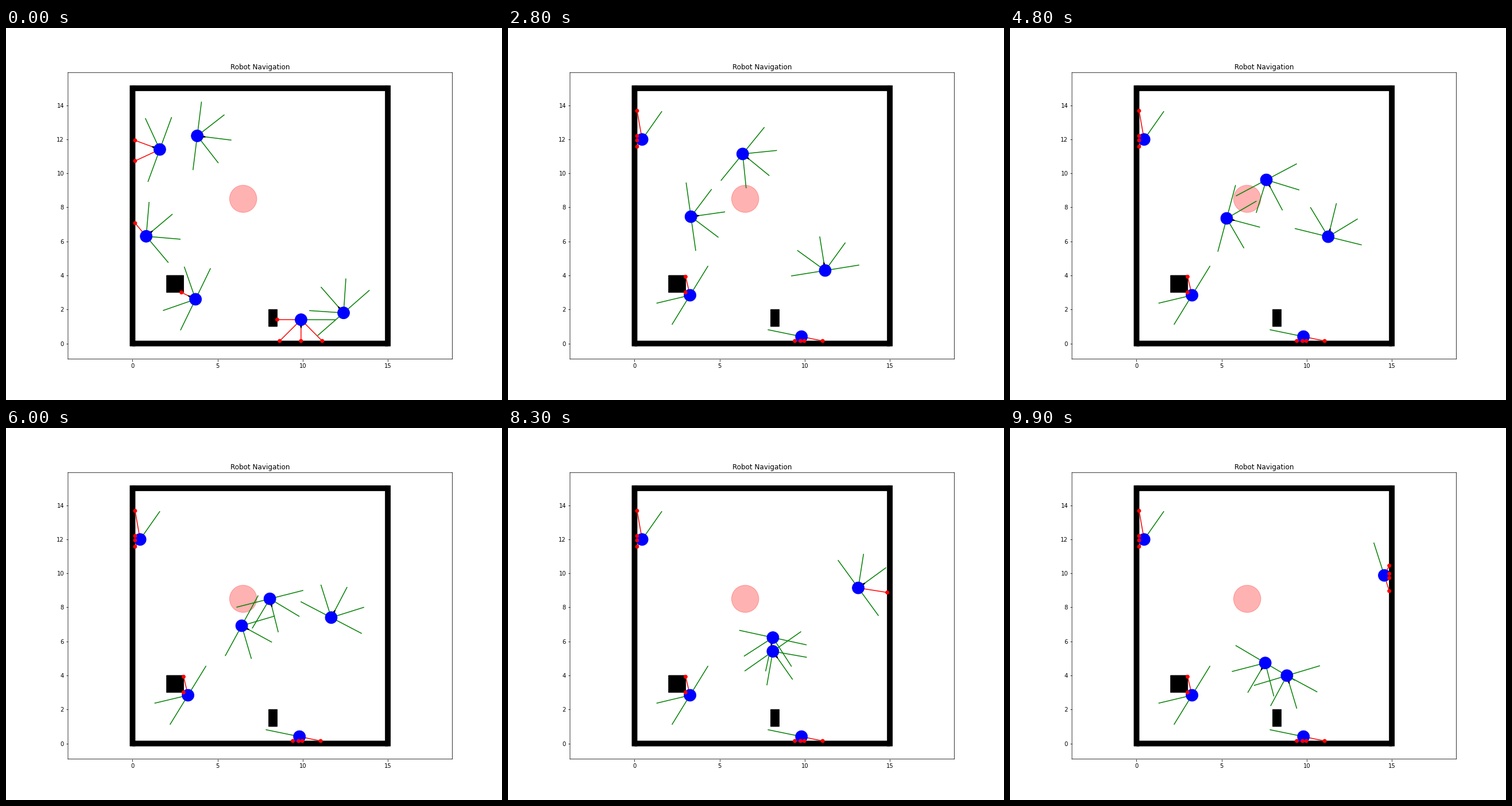
A matplotlib script for the animation above (10000 ms loop, 864x648 px).

```python
import numpy as np
import matplotlib.pyplot as plt
from matplotlib.animation import FuncAnimation
from matplotlib.patches import Circle, Rectangle

FRAMES, INTERVAL = 100, 100
SIZE, HALF = 15, 0.15        # room side, half wall thickness
RADIUS, RANGE = 0.35, 2.0
SPEED, TURN = 0.1, -0.02     # per step
RAYS = np.radians([-90, -45, 0, 45, 90])

# x0, y0, x1, y1
BOXES = [
    (-HALF, -HALF, HALF, SIZE + HALF),
    (SIZE - HALF, -HALF, SIZE + HALF, SIZE + HALF),
    (0, -HALF, SIZE, HALF),
    (0, SIZE - HALF, SIZE, SIZE + HALF),
    (2, 3, 3, 4),
    (8, 1, 8.5, 2),
]

# x, y, heading
STARTS = [
    (1.6, 11.4, 2.79),
    (3.8, 12.2, -0.124),
    (0.8, 6.3, 0.70),
    (3.7, 2.6, 2.69),
    (9.9, 1.4, 4.71),
    (12.4, 1.8, 2.29),
]


def clearance(x, y):
    return min(np.hypot(max(x0 - x, 0, x - x1), max(y0 - y, 0, y - y1))
               for x0, y0, x1, y1 in BOXES)


def drive(x, y, a):
    """Poses of one robot; it halts once it touches an obstacle."""
    poses = [(x, y, a)]
    while len(poses) < FRAMES:
        if clearance(x, y) >= RADIUS:
            x += SPEED * np.cos(a)
            y += SPEED * np.sin(a)
            a += TURN
        poses.append((x, y, a))
    return poses


def cast(x, y, a):
    """Distance to the nearest box along a ray, or None if out of range."""
    c, s = np.cos(a) + 1e-12, np.sin(a) + 1e-12
    best = None
    for x0, y0, x1, y1 in BOXES:
        tx = sorted(((x0 - x) / c, (x1 - x) / c))
        ty = sorted(((y0 - y) / s, (y1 - y) / s))
        near, far = max(tx[0], ty[0]), min(tx[1], ty[1])
        if 0 <= near <= far and near <= (best or RANGE):
            best = near
    return best


class Robot:
    def __init__(self, ax, start):
        self.poses = drive(*start)
        self.rays = [ax.plot([], [], lw=1.5, zorder=2)[0] for _ in RAYS]
        self.arrow = ax.arrow(0, 0, RADIUS, 0, head_width=0.1,
                              head_length=0.15, color="black", zorder=2.5)
        self.body = ax.add_patch(Circle((0, 0), RADIUS, color="blue", zorder=3))
        self.dots = [ax.add_patch(Circle((0, 0), 0.1, color="red", zorder=4))
                     for _ in RAYS]

    def show(self, i):
        x, y, a = self.poses[i]
        for line, dot, offset in zip(self.rays, self.dots, RAYS):
            d = cast(x, y, a + offset)
            reach = RANGE if d is None else d
            end = (x + reach * np.cos(a + offset), y + reach * np.sin(a + offset))
            line.set_data([x, end[0]], [y, end[1]])
            line.set_color("green" if d is None else "red")
            dot.center = end
            dot.set_visible(d is not None)
        self.arrow.set_data(x=x, y=y, dx=RADIUS * np.cos(a), dy=RADIUS * np.sin(a))
        self.body.center = (x, y)


fig, ax = plt.subplots(figsize=(12, 9), dpi=72)
ax.set_title("Robot Navigation")
for spine in ax.spines.values():
    spine.set_snap(False)
for x0, y0, x1, y1 in BOXES:
    ax.add_patch(Rectangle((x0, y0), x1 - x0, y1 - y0, color="black", snap=False))
ax.add_patch(Circle((6.5, 8.5), 0.8, color="red", alpha=0.3))
robots = [Robot(ax, start) for start in STARTS]

# equal scale on both axes with a 5 % margin around the walls
half_h = (SIZE / 2 + HALF) * 1.1
half_w = half_h * (12 * 0.775) / (9 * 0.77)
ax.set_xlim(SIZE / 2 - half_w, SIZE / 2 + half_w)
ax.set_ylim(SIZE / 2 - half_h, SIZE / 2 + half_h)


def update(i):
    for robot in robots:
        robot.show(i)
    return []


anim = FuncAnimation(fig, update, frames=FRAMES, interval=INTERVAL,
                     repeat=True, repeat_delay=0)
plt.show()
```
